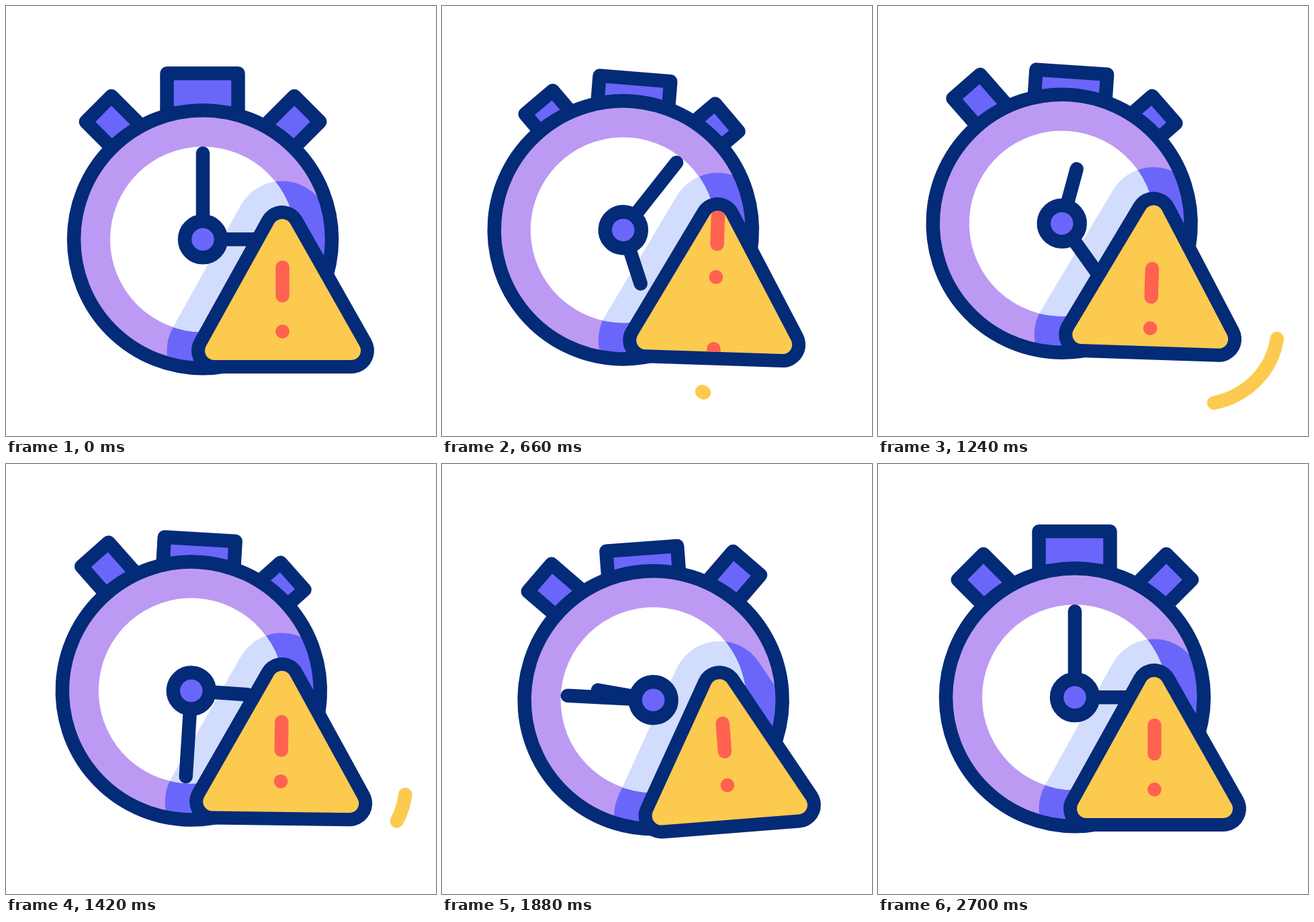
An HTML page with a canvas that plays this animation: 640 by 640 pixels, repeating every 2820 ms.

```html
<!DOCTYPE html>
<html lang="en">
<head>
<meta charset="utf-8">
<title>Stopwatch warning</title>
<style>
  html, body { margin: 0; width: 100%; height: 100%; overflow: hidden; background: #fff; }
  canvas { display: block; width: 640px; height: 640px; }
</style>
</head>
<body>
<canvas id="stage" width="640" height="640"></canvas>
<script>
const ctx = document.getElementById('stage').getContext('2d');
const LOOP = 2820, TAU = Math.PI * 2, DEG = Math.PI / 180;
const NAVY = '#032b77', VIOLET = '#6b66fa', LILAC = '#bc9af3', PALE = '#d2ddfd',
      YELLOW = '#fdca50', RED = '#ff6250';
const CX = 293, CY = 347.3, RING = 192, PITCH = 198;
const BEATS = [250, 617, 965, 1315, 1745, 2130];

// Smooth step from 0 to 1 between two times.
function ease(t, from, to) {
  const x = Math.min(1, Math.max(0, (t - from) / (to - from)));
  return x * x * (3 - 2 * x);
}

// Rises to 1 around `on` and falls back around `off`.
function hold(t, on, off, fade) {
  const half = fade / 2;
  return ease(t, on - half, on + half) - ease(t, off - half, off + half);
}

// Rest, then a, b, a, b and back to rest, one move per beat.
function sway(t, a, b) {
  const stops = [0, a, b, a, b, 0];
  return BEATS.slice(1).reduce((sum, beat, i) =>
    sum + (stops[i + 1] - stops[i]) * ease(t, BEATS[i], beat), 0);
}

function pose(px, py, degrees, dy) {
  ctx.setTransform(1, 0, 0, 1, px, py + dy);
  ctx.rotate(degrees * DEG);
  ctx.translate(-px, -py);
}

function fill(color) { ctx.fillStyle = color; ctx.fill(); }

function stroke(color, width = 20.5) {
  ctx.strokeStyle = color;
  ctx.lineWidth = width;
  ctx.stroke();
}

function circle(x, y, r) {
  ctx.beginPath();
  ctx.arc(x, y, r, 0, TAU);
}

function line(x0, y0, x1, y1, color) {
  ctx.beginPath();
  ctx.moveTo(x0, y0);
  ctx.lineTo(x1, y1);
  stroke(color);
}

// Triangle with corners rounded by r around fixed corner centres.
function triangle(r) {
  const side = 0.515;
  ctx.beginPath();
  ctx.arc(411, 331, r, Math.PI + side, TAU - side);
  ctx.arc(514, 513, r, -side, Math.PI / 2);
  ctx.arc(310, 513, r, Math.PI / 2, Math.PI + side);
  ctx.closePath();
}

function button(t, angle, x, width, release) {
  ctx.save();
  ctx.translate(CX, CY);
  ctx.rotate(angle * DEG);
  ctx.beginPath();
  ctx.rect(x, 21 * hold(t, 170, release, 200) - 247, width, 65);
  fill(VIOLET);
  stroke(NAVY);
  ctx.restore();
}

function hand(degrees, length) {
  const a = degrees * DEG;
  line(CX, CY, CX + length * Math.sin(a), CY - length * Math.cos(a), NAVY);
}

function swoosh(t) {
  const length = 262;
  const head = length * ease(t, 617, 1284), tail = length * ease(t, 950, 1580);
  if (head - tail < 1) return;
  ctx.beginPath();
  ctx.moveTo(387, 574);
  ctx.quadraticCurveTo(428, 594, 475, 593.5);
  ctx.bezierCurveTo(545, 592, 595, 540, 595, 479);
  ctx.setLineDash([head - tail, 1000]);
  ctx.lineDashOffset = -tail;
  stroke(YELLOW);
  ctx.setLineDash([]);
}

function draw(t) {
  const watchPose = () => pose(CX, 58, sway(t, 5.1, -6), sway(t + 80, -23, 11.5));
  const signPose = () => pose(411, 305, sway(t + 15, 2.6, -6.8), sway(t + 80, -20.5, 8));
  const turn = 360 * ease(t, 200, 2640);

  ctx.setTransform(1, 0, 0, 1, 0, 0);
  ctx.fillStyle = '#fff';
  ctx.fillRect(0, 0, 640, 640);
  ctx.lineCap = ctx.lineJoin = 'round';
  swoosh(t);

  watchPose();
  button(t, 0, -53.5, 106, 2180);
  button(t, -45, 0.5, 54, 1090);
  button(t, 45, -54.5, 54, 1820);

  // Dial rings, each with the sign's shadow clipped to it.
  for (const [radius, color, shade] of [[RING, LILAC, VIOLET], [138, '#fff', PALE]]) {
    ctx.save();
    watchPose();
    circle(CX, CY, radius);
    fill(color);
    ctx.clip();
    signPose();
    triangle(70.5);
    fill(shade);
    ctx.restore();
  }

  watchPose();
  circle(CX, CY, RING);
  stroke(NAVY);
  hand(turn, 128);
  hand(90 + 2 * turn, 84);
  circle(CX, CY, 27);
  fill(VIOLET);
  stroke(NAVY);

  signPose();
  triangle(34);
  fill(NAVY);
  triangle(14);
  fill(YELLOW);

  // The mark scrolls up, a second one follows it and later hops once.
  const scroll = -PITCH * ease(t, 120, 1540) - 24 * hold(t, 1960, 2410, 450);
  const squeeze = 7 * hold(t, 620, 1870, 440);
  ctx.save();
  ctx.clip();
  for (const y of [scroll, scroll + PITCH]) {
    line(411.5, 389 + y, 411.5, 431 + y, RED);
    circle(411.5, 484.5 + y - squeeze, 10.4);
    fill(RED);
  }
  ctx.restore();
}

const start = performance.now();
function frame() {
  draw((performance.now() - start) % LOOP);
  requestAnimationFrame(frame);
}
frame();
</script>
</body>
</html>
```
